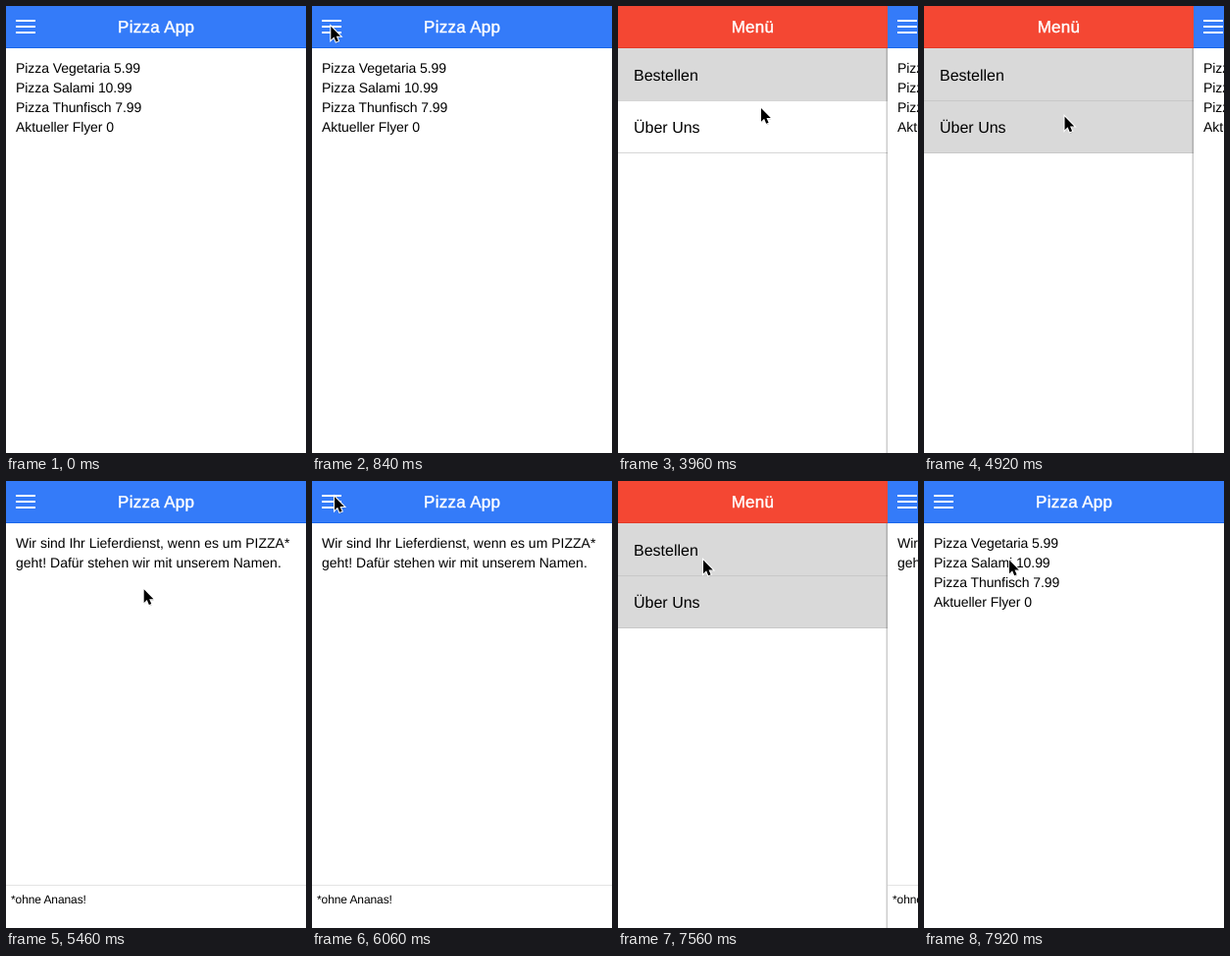
An HTML page that plays this animation: 306 px wide and 455 px high, repeating every 8 s.

```html
<!DOCTYPE html>
<html lang="de">
<head>
<meta charset="utf-8">
<title>Pizza App</title>
<style>
html, body { margin: 0; width: 100%; height: 100%; overflow: hidden; background: #fff; }
svg { display: block; width: 100vw; height: 100vh; }
text {
  font-family: "Liberation Sans", Arial, sans-serif; font-size: 14px; fill: #000;
  white-space: pre; text-rendering: geometricPrecision;
}
.title { font-size: 17px; fill: #fff; stroke: #fff; stroke-width: .4px; text-anchor: middle; letter-spacing: .3px; }
.item { font-size: 16px; }
.list { letter-spacing: -.07px; }
.note { font-size: 12px; letter-spacing: -.1px; }
</style>
</head>
<body>
<svg viewBox="0 0 306 455">
  <rect width="306" height="455" fill="#fff"/>
  <g id="menu">
    <rect width="275" height="43" fill="#f44733"/>
    <text class="title" x="137.5" y="27">Menü</text>
    <rect id="order" y="43" width="275" height="54"/>
    <rect id="about" y="97" width="275" height="53"/>
    <path id="lines" d="M0 96.5H275M0 149.5H275"/>
    <rect y="42" width="275" height="1" fill="#e23a28"/>
    <text class="item" x="16" y="76">Bestellen</text>
    <text class="item" x="16" y="129">Über Uns</text>
  </g>
  <g id="page">
    <rect x="-2" y="43" width="1" height="412" opacity=".09"/>
    <rect x="-1" y="43" width="1" height="412" opacity=".2"/>
    <rect width="306" height="455" fill="#fff"/>
    <rect width="306" height="43" fill="#347bf9"/>
    <rect y="42" width="306" height="1" fill="#1a66ea"/>
    <path d="M10 15H30M10 21H30M10 27H30" stroke="#fff" stroke-width="1.8"/>
    <text class="title" x="153.2" y="27">Pizza App</text>
    <g id="pizzas" class="list">
      <text x="10" y="68">Pizza Vegetaria 5.99</text>
      <text x="10" y="88">Pizza Salami 10.99</text>
      <text x="10" y="108">Pizza Thunfisch 7.99</text>
      <text x="10" y="128">Aktueller Flyer 0</text>
    </g>
    <g id="info">
      <text x="10" y="68">Wir sind Ihr Lieferdienst, wenn es um PIZZA*</text>
      <text x="10" y="88">geht! Dafür stehen wir mit unserem Namen.</text>
      <rect y="411" width="306" height="1" fill="#e4e4e4"/>
      <text class="note" x="5" y="430">*ohne Ananas!</text>
    </g>
  </g>
  <g id="cursor">
    <path d="M1 1V15L4.2 12L6.4 17L8.8 16L6.7 11.2H11Z" transform="translate(.4 1.2)" opacity=".2"/>
    <path d="M1 1V14.8L4.1 11.8L6.2 16.7L8.6 15.7L6.5 10.9H10.8Z" fill="#000" stroke="#fff" stroke-width="2" paint-order="stroke"/>
  </g>
</svg>
<script>
const LOOP = 8000, STEP = 60, MENU_W = 275;
const el = id => document.getElementById(id);
const [order, about, lines, page, pizzas, info, cursor] =
  ["order", "about", "lines", "page", "pizzas", "info", "cursor"].map(el);

const clamp = v => Math.min(1, Math.max(0, v));
const smooth = v => v * v * (3 - 2 * v);
const show = (node, on) => node.setAttribute("visibility", on ? "visible" : "hidden");
const shade = (node, on) => node.setAttribute("fill", on ? "#d9d9d9" : "#fff");

// CSS "ease": cubic-bezier(.25, .1, .25, 1)
function ease(x) {
  const curve = (s, a, b) => 3 * (1 - s) ** 2 * s * a + 3 * (1 - s) * s * s * b + s ** 3;
  let lo = 0, hi = 1;
  for (let i = 0; i < 24; i++) {
    const mid = (lo + hi) / 2;
    if (curve(mid, .25, .25) < x) lo = mid; else hi = mid;
  }
  return curve(lo, .1, 1);
}

// Slide progress; settles on the fourth step
function slide(t, start) {
  if (t < start) return 0;
  return t >= start + 180 ? 1 : ease((t - start + 20) / 240);
}

// Cursor moves: start, end, target x, target y
const moves = [
  [180, 840, 18.3, 19.8],
  [3540, 3960, 145, 103],
  [4440, 4680, 142.5, 111.5],
  [5400, 6060, 22, 15],
  [6840, 7440, 86, 79.5]
];

function cursorAt(t) {
  let x = 137, y = -14;
  for (const [from, to, tx, ty] of moves) {
    const p = smooth(clamp((t - from) / (to - from)));
    x += (tx - x) * p;
    y += (ty - y) * p;
  }
  return [x, y];
}

function draw(time) {
  const t = Math.floor((time % LOOP) / STEP) * STEP;
  const open = slide(t, 2520) - slide(t, 5040) + slide(t, 6660) - slide(t, 7740);
  page.setAttribute("transform", `translate(${(open * MENU_W).toFixed(2)} 0)`);

  const onInfo = t >= 4980 && t < 7740;
  const aboutOn = t >= 4920 && t < 7740;
  show(pizzas, !onInfo);
  show(info, onInfo);
  shade(order, t < 4980 || t >= 7560);
  shade(about, aboutOn);
  lines.setAttribute("stroke", aboutOn ? "#c8c8c8" : "#d6d6d6");

  const [x, y] = cursorAt(t);
  show(cursor, t >= 240);
  cursor.setAttribute("transform", `translate(${x.toFixed(2)} ${y.toFixed(2)})`);
}

const begin = performance.now();
function tick() {
  draw(performance.now() - begin);
  requestAnimationFrame(tick);
}
tick();
</script>
</body>
</html>
```
